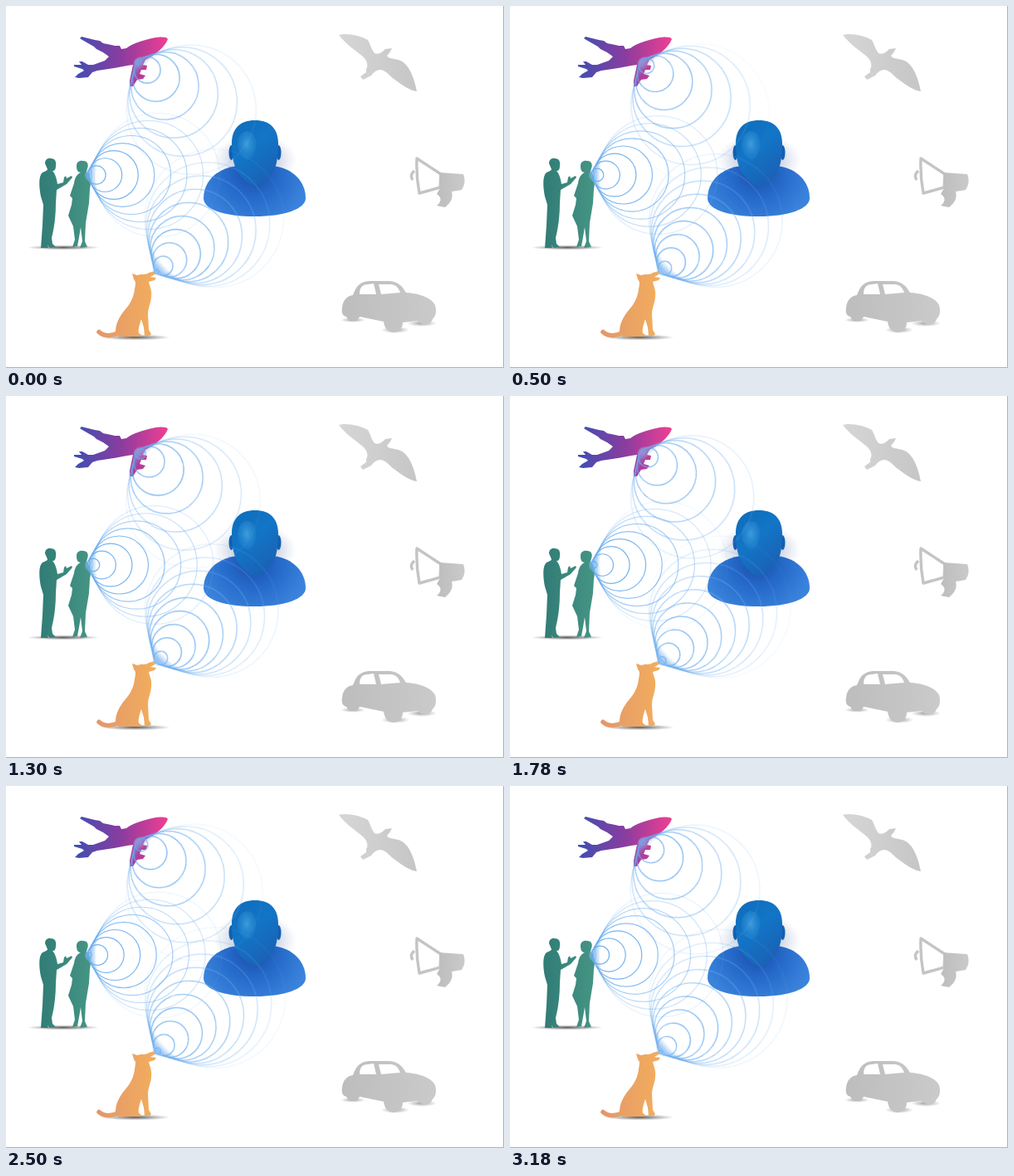
Write an HTML page that moves like this. It is 600 px wide and 437 px high and loops after 3200 ms.

```html
<!DOCTYPE html>
<html lang="en">
<head>
<meta charset="utf-8">
<title>Sound sources around a listener</title>
<style>
  html, body { margin: 0; width: 100%; height: 100%; overflow: hidden; background: #fff; }
  svg { display: block; width: 600px; height: 437px; }
  .ring {
    fill: none; stroke: #68abee; stroke-width: 1.2;
    animation: spread var(--life) linear infinite, fade var(--life) linear infinite;
  }
  @keyframes spread {
    from { cx: 0; r: 0; }
    to { cx: var(--reach); r: var(--size); }
  }
  @keyframes fade {
    0% { opacity: 0; }
    5%, 35% { opacity: .9; }
    60% { opacity: .58; }
    85% { opacity: .24; }
    100% { opacity: 0; }
  }
</style>
</head>
<body>
<svg viewBox="0 0 600 437">
  <defs>
    <linearGradient id="sky">
      <stop offset="0" stop-color="#3f4fb2"/>
      <stop offset=".5" stop-color="#8a3c9f"/>
      <stop offset="1" stop-color="#f03f92"/>
    </linearGradient>
    <linearGradient id="teal" gradientUnits="userSpaceOnUse" x1="40" x2="103" y1="0" y2="0">
      <stop offset="0" stop-color="#317c76"/>
      <stop offset="1" stop-color="#459584"/>
    </linearGradient>
    <linearGradient id="amber" gradientUnits="userSpaceOnUse" x1="109" x2="181" y1="0" y2="0">
      <stop offset="0" stop-color="#e2976c"/>
      <stop offset="1" stop-color="#f3ae5c"/>
    </linearGradient>
    <linearGradient id="gray">
      <stop offset="0" stop-color="#bdbdbd"/>
      <stop offset="1" stop-color="#cacaca"/>
    </linearGradient>
    <linearGradient id="feather">
      <stop offset="0" stop-color="#d6d6d6"/>
      <stop offset="1" stop-color="#c6c6c6"/>
    </linearGradient>
    <radialGradient id="shade">
      <stop offset="0" stop-color="#000" stop-opacity=".65"/>
      <stop offset=".5" stop-color="#000" stop-opacity=".3"/>
      <stop offset="1" stop-color="#000" stop-opacity="0"/>
    </radialGradient>
    <radialGradient id="halo">
      <stop offset=".4" stop-color="#6a7fae" stop-opacity=".42"/>
      <stop offset="1" stop-color="#8a9cc4" stop-opacity="0"/>
    </radialGradient>
    <radialGradient id="torso" gradientUnits="userSpaceOnUse" cx="298" cy="200" r="66">
      <stop offset="0" stop-color="#1b4ba6"/>
      <stop offset=".45" stop-color="#2468c8"/>
      <stop offset="1" stop-color="#3a83dc"/>
    </radialGradient>
    <linearGradient id="head" x2=".6" y2="1">
      <stop offset="0" stop-color="#0f6cbb"/>
      <stop offset=".5" stop-color="#1275c6"/>
      <stop offset="1" stop-color="#1a62b6"/>
    </linearGradient>
    <radialGradient id="shine" cy=".45">
      <stop offset="0" stop-color="#45a0de" stop-opacity=".9"/>
      <stop offset="1" stop-color="#2488d0" stop-opacity=".4"/>
    </radialGradient>
    <radialGradient id="glow" cx=".2">
      <stop offset="0" stop-color="#9cc8f8" stop-opacity=".5"/>
      <stop offset="1" stop-color="#cfe4fb" stop-opacity="0"/>
    </radialGradient>
  </defs>

  <g id="plane">
    <path fill="url(#sky)" d="M195 40C194 37 186 37 178 38.500C166 41 153 45 145 51L139 52L137 48L131 48L127 47L117 45L113 42L107 41L91 37L89 39L92 41L106 49L109 52L117 56L124 61L119 66L105 71L99 71L92 67L88 67L91 71L82 71L82 73L92 76L94 78L87 82L83 86L88 87L99 86L104 80L110 78L130 75L146 72L153 71L149 90L149 97L153 97L158 89L165 88L168 84L161 82L163 77L169 77L170 72L165 71L168 65C180 59 191 50 195 40Z"/>
  </g>

  <g id="people">
    <ellipse cx="69" cy="291.5" rx="44" ry="3" fill="url(#shade)"/>
    <g fill="url(#teal)">
      <path d="M47 190C47 185 51 183 54 184C59 184 61 188 60 193C60 198 58 199 56 199C59 202 61 208 62 215L69 213L70 207L72 205L73 208L79 205L80 207L73 215L61 222L60 238C60 254 58 268 55 280L56 287L60 291L53 292L50 289L51 292L42 292L44 264L45 240L42 230C40 220 39 207 43 202C46 199 49 200 50 197Z"/>
      <path d="M85 193C85 188 89 186 93 187C98 187 100 191 98 196L97 200C102 204 103 212 101 221L100 238L96 262L95 284L98 291L89 292L92 284L90 267L88 279L86 290L80 291L83 282L81 266L75 253L79 240L80 232L77 229L82 214C83 206 86 203 90 201C86 201 85 197 85 193Z"/>
    </g>
  </g>

  <g id="dog">
    <ellipse cx="156" cy="400" rx="42" ry="3.5" fill="url(#shade)"/>
    <path fill="none" stroke="url(#amber)" stroke-width="5.5" stroke-linecap="round" d="M136 394C128 399 118 399 112 393.500"/>
    <path fill="url(#amber)" d="M152 323L158 325C164 323 168 325 172 322L179 320L181 323L174 327L181 328L179 331L172 333C173 338 176 343 175 350C175 358 171 364 171 372L172 391L175 396L173 398L167 398L166 388L163 378C161 384 159 390 160 395L163 397L162 399L146 399C139 400 135 399 132 397C131 384 137 374 144 366C151 358 154 350 155 342C156 336 157 333 154 330Z"/>
  </g>

  <g id="bird" fill="url(#feather)">
    <path d="M401 35C410 32 428 36 436 41C439 46 440 52 444 57C449 59 453 56 457 52L465 51L463 55L459 60C461 64 466 63 473 65C485 69 491 84 495 103C487 102 478 96 470 90C462 85 460 79 452 77C446 77 443 80 440 84L430 89L427 85L434 80L434 76C437 71 435 66 430 61C423 55 410 47 401 35Z"/>
  </g>

  <g id="megaphone" fill="url(#gray)">
    <path fill="none" stroke="#c4c4c4" stroke-width="3.4" stroke-linejoin="round" d="M495 184L524 203L523 219L498 226Q494 205 495 184ZM492 199Q486 204 490 210"/>
    <path d="M522 201L551 203Q555 213 549 222L537 224C539 232 536 237 529 243L519 241C525 236 525 231 519 227L523 220Z"/>
  </g>

  <g id="car">
    <ellipse cx="418" cy="379" rx="15" ry="3" fill="url(#shade)" opacity=".6"/>
    <ellipse cx="469" cy="391" rx="17" ry="4" fill="url(#shade)" opacity=".6"/>
    <ellipse cx="501" cy="383" rx="18" ry="4" fill="url(#shade)" opacity=".6"/>
    <path fill="url(#gray)" d="M405 364C406 354 412 350 418 349C422 338 426 333 438 332L462 332C473 333 477 338 482 346C498 347 512 352 517 361C519 368 518 375 514 378C511 386 500 386 496 380L478 382C478 390 473 394 467 394C460 394 456 389 455 381L426 375C424 381 413 382 410 375C405 374 404 369 405 364Z"/>
    <path fill="#fff" d="M426 348C426 340 429 336 436 336L443 335L446 348ZM449 336L464 336C471 337 473 341 475 346L452 348Z"/>
  </g>

  <g id="listener">
    <ellipse cx="300" cy="186" rx="50" ry="32" fill="url(#halo)"/>
    <path fill="url(#torso)" d="M238 232C238 212 254 196 278 193L322 193C346 196 361 212 361 232C361 245 335 254 300 254C264 254 238 246 238 232Z"/>
    <g fill="#145fb2">
      <ellipse cx="271.500" cy="177" rx="3" ry="9"/>
      <ellipse cx="328.500" cy="177" rx="3" ry="9"/>
    </g>
    <path fill="url(#head)" d="M300 138C318 138 328 148 328 166C328 182 326 196 319 205C313 213 306 217 301 217C295 217 287 211 281 203C274 194 272 180 272 166C272 148 282 138 300 138Z"/>
    <path fill="url(#shine)" d="M291 151C299 152 302 160 301 169C300 178 296 185 291 185C284 184 279 176 279 167C279 158 284 151 291 151Z"/>
  </g>

  <g id="waves"></g>
  <path fill="none" stroke="#b0b0b0" d="M599.5 0V436.5H0"/>
</svg>
<script>
  const NS = "http://www.w3.org/2000/svg";
  const waves = document.getElementById("waves");

  // period: ms between rings; step: px travelled per period; age: first ring's age in periods
  const sources = [
    { x: 156.5, y: 65, angle: 42, spread: .87, period: 3200 / 3, step: 14.3, age: .28, count: 7 },
    { x: 96, y: 204, angle: 0, spread: .865, period: 800, step: 10.5, age: .23, count: 9 },
    { x: 179.3, y: 323, angle: -43, spread: .857, period: 800, step: 10.5, age: .3, count: 10 }
  ];

  function add(parent, tag, attrs) {
    const el = document.createElementNS(NS, tag);
    for (const key in attrs) el.setAttribute(key, attrs[key]);
    return parent.appendChild(el);
  }

  for (const s of sources) {
    const g = add(waves, "g", { transform: `translate(${s.x} ${s.y}) rotate(${s.angle})` });
    const reach = s.step * s.count;
    g.style.setProperty("--life", s.period * s.count + "ms");
    g.style.setProperty("--reach", reach + "px");
    g.style.setProperty("--size", reach * s.spread + "px");
    add(g, "circle", { cx: 9, r: 10, fill: "url(#glow)" });
    for (let i = 0; i < s.count; i++) {
      const ring = add(g, "circle", { class: "ring" });
      ring.style.animationDelay = -(s.age + i) * s.period + "ms";
    }
  }
</script>
</body>
</html>
```
